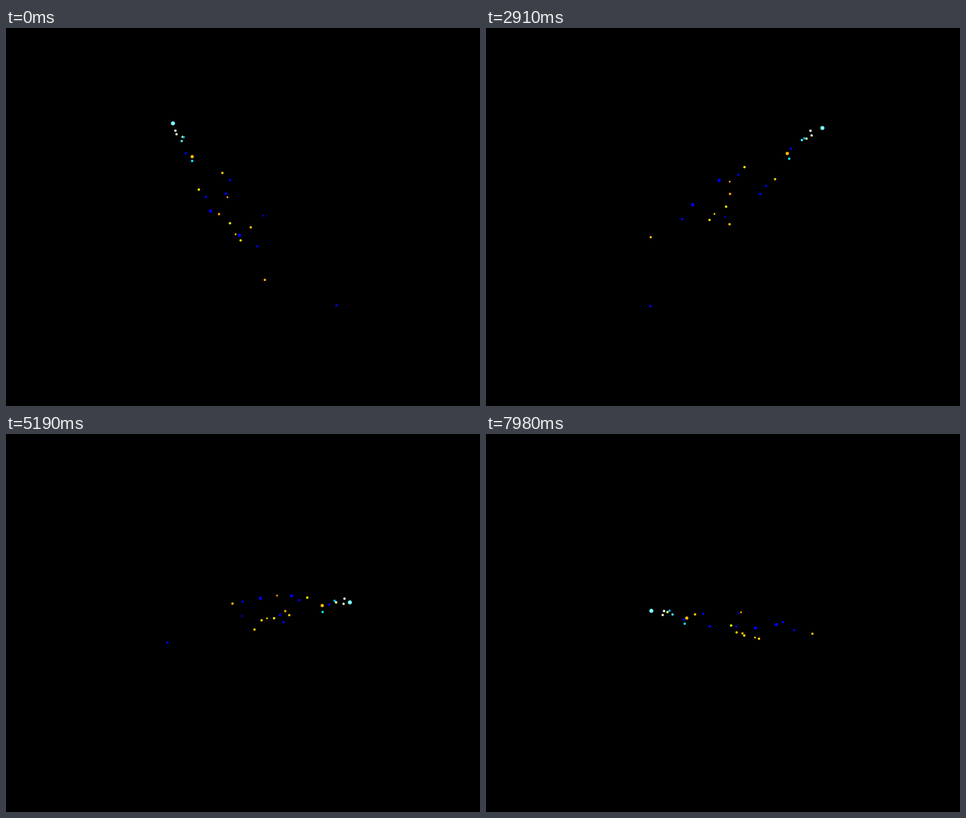
Write a matplotlib script that moves like this. It is 837 by 669 pixels and loops after 8000 ms.

```python
import numpy as np
import matplotlib.pyplot as plt
from matplotlib.animation import FuncAnimation

W, H, DPI = 837, 669, 100
CX, CY = 435.9, 330.9      # screen point of the rotation centre
DIST = 2784.5              # eye distance in pixels
ELEV = np.radians(30)

BLUE, AMBER = "#0000ff", "#ffaa00"
GOLD, YELLOW = "#ffc800", "#ffee00"

# x, y, z, diameter, colour
STARS = [
    (-144.7, 144.7, 108.5, 7.2, "#7dfcff"),
    (-139.4, 123.7, 104.3, 4.2, "#ffffff"),
    (-137.7, 126.1, 95.8, 4.2, "#fff5c8"),
    (-126.4, 117.8, 94.6, 4.2, "#ffff60"),
    (-124.4, 114.2, 96.0, 4.2, "#00b4ff"),
    (-127.8, 109.5, 90.5, 4.2, "#40f0ff"),
    (-120.0, 90.3, 75.6, 4.2, BLUE),
    (-108.6, 85.2, 71.6, 5.8, "#ffbe00"),
    (-109.0, 88.8, 61.0, 4.2, "#00f5ff"),
    (-54.5, 68.9, 47.2, 4.2, GOLD),
    (-40.5, 54.3, 40.3, 4.2, BLUE),
    (-48.9, 42.8, 18.7, 4.0, BLUE),
    (-47.4, 44.3, 19.2, 3.2, BLUE),
    (-94.9, 9.5, 46.1, 4.2, "#ffff00"),
    (-82.4, 0.0, 36.6, 4.2, BLUE),
    (-73.8, -33.8, 27.3, 5.8, BLUE),
    (-44.3, -11.1, 42.3, 3.3, "#ffa000"),
    (-59.4, -12.5, 8.9, 4.2, AMBER),
    (17.9, -11.1, 5.1, 3.3, BLUE),
    (-40.2, -17.1, -7.0, 4.2, YELLOW),
    (-3.7, -6.4, -21.6, 4.2, GOLD),
    (-30.2, -36.9, -17.8, 3.3, GOLD),
    (-23.0, -75.1, 2.8, 5.8, BLUE),
    (-21.4, -44.7, -25.7, 4.2, "#ffdc00"),
    (7.5, -89.9, -10.5, 4.2, BLUE),
    (20.4, -144.7, -44.2, 4.2, "#ffb400"),
    (144.7, -126.0, -108.5, 4.2, BLUE),
]
X, Y, Z, DIAM = np.array([s[:4] for s in STARS]).T
COLORS = np.array([s[4] for s in STARS])
AREAS = (DIAM * 72 / DPI) ** 2


def project(deg):
    """Screen positions and depth towards the eye at a given azimuth."""
    a = np.radians(deg)
    side = X * np.cos(a) + Y * np.sin(a)
    near = X * np.sin(a) - Y * np.cos(a)
    up = Z * np.cos(ELEV) - near * np.sin(ELEV)
    depth = near * np.cos(ELEV) + Z * np.sin(ELEV)
    scale = DIST / (DIST - depth)
    return np.column_stack([CX + side * scale, CY - up * scale]), depth


# the small surplus keeps the pixel size from rounding down
fig = plt.figure(figsize=((W + 0.01) / DPI, (H + 0.01) / DPI), dpi=DPI,
                 facecolor="black")
ax = fig.add_axes([0, 0, 1, 1])
ax.set_xlim(0, W)
ax.set_ylim(H, 0)
ax.axis("off")
dots = ax.scatter(X, Y, s=AREAS, c=COLORS, linewidths=0)


def draw(i):
    # one degree every 30 ms, drawn on a 20 ms clock
    pos, depth = project((2 * i + 1) // 3)
    order = np.argsort(depth)
    dots.set_offsets(pos[order])
    dots.set_sizes(AREAS[order])
    dots.set_facecolor(COLORS[order])
    return dots,


anim = FuncAnimation(fig, draw, frames=400, interval=20, repeat=True,
                     repeat_delay=0, init_func=lambda: draw(0))
plt.show()
```
